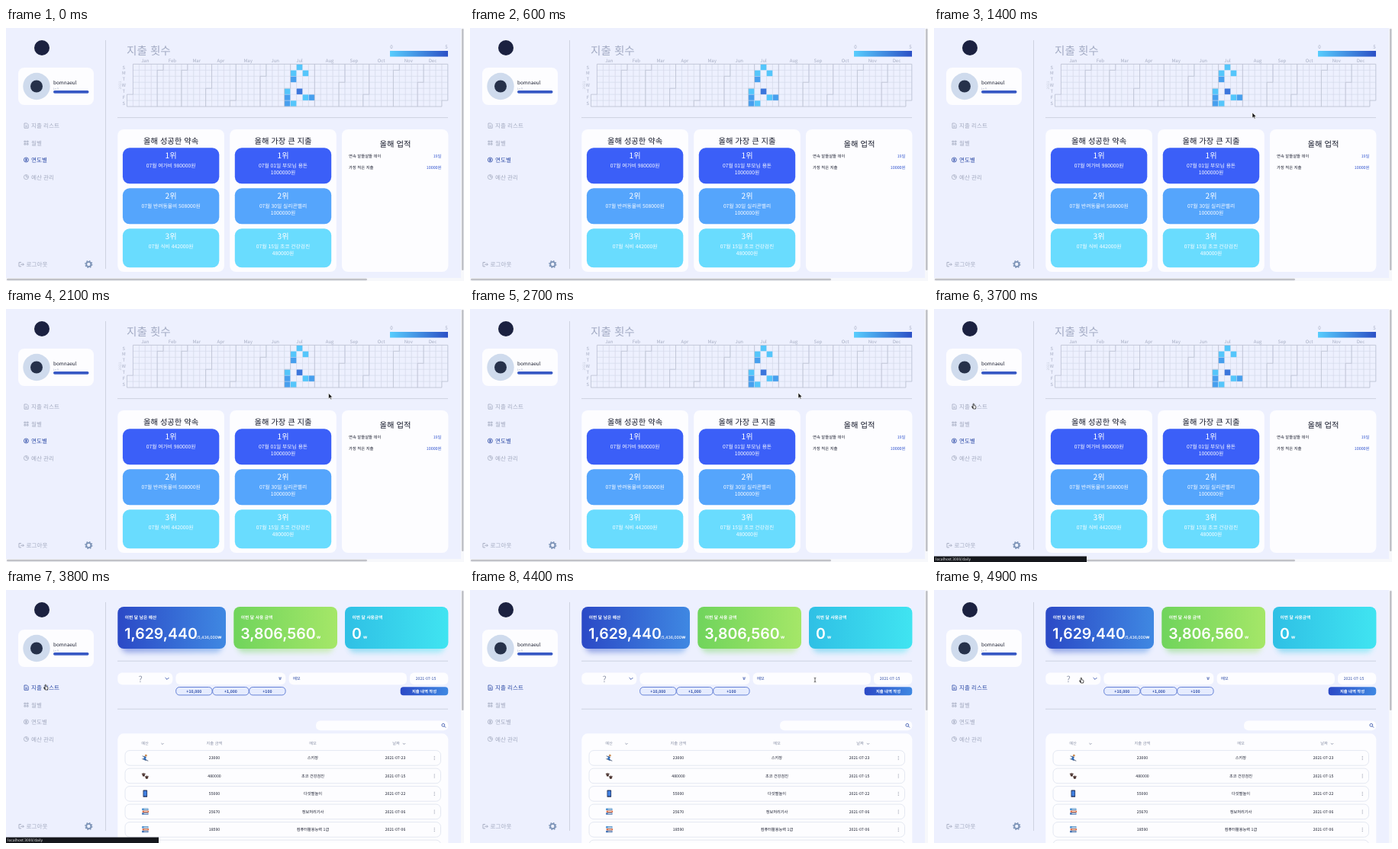
An HTML page for the animation above (5 s loop, 600x332 px).

```html
<!DOCTYPE html>
<html lang="ko">
<head>
<meta charset="utf-8">
<title>Budget dashboard</title>
<style>
html, body { margin: 0; width: 100%; height: 100%; overflow: hidden; background: #edf0fe; }
svg { display: block; width: 100vw; height: 100vh; }
text {
  font-family: "Noto Sans CJK KR", "Noto Sans CJK JP", "Noto Sans CJK", "Noto Sans", sans-serif;
  text-rendering: geometricPrecision;
}
.num { font-family: Inter, "Noto Sans CJK KR", sans-serif; }
</style>
</head>
<body>
<svg id="stage" viewBox="0 0 600 332">
  <defs>
    <linearGradient id="blue"><stop stop-color="#2b49c6"/><stop offset="1" stop-color="#3f88e2"/></linearGradient>
    <linearGradient id="green"><stop stop-color="#70d45c"/><stop offset="1" stop-color="#a5e768"/></linearGradient>
    <linearGradient id="cyan"><stop stop-color="#2fc0e5"/><stop offset="1" stop-color="#40e4f1"/></linearGradient>
    <linearGradient id="scale"><stop stop-color="#58cdfd"/><stop offset="1" stop-color="#2c50c6"/></linearGradient>
    <filter id="soft" x="-20%" y="-50%" width="140%" height="200%"><feGaussianBlur stdDeviation="3.5"/></filter>
  </defs>
  <rect width="600" height="332" fill="#edf0fe"/>
  <g id="sidebar"></g>
  <g id="yearly"></g>
  <g id="daily"></g>
  <g id="status">
    <rect y="324.5" width="200" height="7.5" fill="#15171c"/>
    <text x="2" y="330" font-size="4.9" fill="#e8e8e8">localhost:3000/daily</text>
  </g>
  <g id="cursor">
    <path id="arrow" d="M0 0V7.2L1.7 5.7 2.8 8.2 4 7.7 2.9 5.3H5.1Z" fill="#111" stroke="#fff" stroke-width=".6"/>
    <path id="hand" d="M-.9 3.3V-2.4Q-.2 -3.5 .5 -2.4V-.3L2.4 .3Q3.2 .7 3 1.6L2.5 4H-.5L-2.5 1.3Q-2.3 .2 -1.6 1Z" fill="#fff" stroke="#222" stroke-width=".8"/>
    <path id="beam" d="M-1.3 -2.8Q0 -2.8 0 -2V2Q0 2.8 -1.3 2.8M1.3 -2.8Q0 -2.8 0 -2M0 2Q0 2.8 1.3 2.8" fill="none" stroke="#222" stroke-width=".7"/>
  </g>
</svg>
<script>
const $ = id => document.getElementById(id);
const GREY = '#a4abc0', NAVY = '#2d4ba6', INK = '#161a2b', WHITE = '#fdfdff', RULE = '#c6cbda';
const MEDIUM = 'font-weight="500"', BOLD = 'font-weight="700"';

const text = (x, y, size, fill, str, more = '') =>
  `<text x="${x}" y="${y}" font-size="${size}" fill="${fill}" ${more}>${str}</text>`;
const mid = (x, y, size, fill, str, more = '') =>
  text(x, y, size, fill, str, 'text-anchor="middle" ' + more);
const box = (x, y, w, h, r, fill, more = '') =>
  `<rect x="${x}" y="${y}" width="${w}" height="${h}" rx="${r}" fill="${fill}" ${more}/>`;
const line = (d, stroke, w = .8, more = '') =>
  `<path d="${d}" fill="none" stroke="${stroke}" stroke-width="${w}" ${more}/>`;
const dot = (x, y, r, fill, more = '') => `<circle cx="${x}" cy="${y}" r="${r}" fill="${fill}" ${more}/>`;
const chevron = (x, y, s, c) => line(`M${x - s} ${y - s / 2}l${s} ${s} ${s} ${-s}`, c, .9);

function sidebar() {
  const icons = [
    'M24 125h3.5l1.7 1.8v4.5h-5.2zM25.4 128h2.3M25.4 129.6h2.3',
    'M23.9 148.2h1.9v1.7h-1.9zM27.2 148.2h1.9v1.7h-1.9zM23.9 151.5h1.9v1.7h-1.9zM27.2 151.5h1.9v1.7h-1.9z',
    'M23.4 173a3 3 0 1 0 6 0a3 3 0 1 0-6 0M25 172.2h2.8M25 174h2.8M26.4 171v4',
    'M23.4 195.6a3 3 0 1 0 6 0a3 3 0 1 0-6 0M26.4 192.8v2.8h2.9'
  ];
  let s = dot(47, 26, 10, '#1b2140')
    + box(16, 52, 99, 49, 8, WHITE)
    + dot(40, 76.5, 17.7, '#cfdbed') + dot(40, 76.5, 8, '#26314a')
    + text(62, 74.2, 6.4, INK, 'bomnaeul')
    + text(62, 80.6, 3.8, GREY, 'Lv.5')
    + box(62, 82, 46.5, 3.7, 1.8, '#3859c4');
  ['지출 리스트', '월별', '연도별', '예산 관리'].forEach((label, i) => {
    s += `<g id="menu${i}" fill="${GREY}" stroke="${GREY}">`
      + `<path d="${icons[i]}" fill="none" stroke-width=".8"/>`
      + `<text x="33" y="${130.8 + i * 22.7}" font-size="7.6" stroke="none" ${MEDIUM}>${label}</text></g>`;
  });
  return s
    + line('M20 307.5h-3v5.4h3M19 310.2h4.3M21.7 308.5l1.7 1.7-1.7 1.7', GREY, .9)
    + text(26.5, 313, 7.6, GREY, '로그아웃', MEDIUM)
    + dot(108.3, 310, 3.1, 'none', 'stroke="#7b92b6" stroke-width="1.8"')
    + dot(108.3, 310, 4.5, 'none', 'stroke="#7b92b6" stroke-width="1.2" stroke-dasharray="1.76 1.77"')
    + line('M130.5 16V316', RULE);
}

function calendar() {
  const X = 158.5, Y = 47.4, W = 7.93, H = 7.95, FIRST = 5;
  const at = day => [Math.floor((day + FIRST) / 7), (day + FIRST) % 7];
  const names = 'Jan Feb Mar Apr May Jun Jul Aug Sep Oct Nov Dec'.split(' ');
  const lengths = [31, 28, 31, 30, 31, 30, 31, 31, 30, 31, 30, 31];
  let grid = '', edges = '', s = '', day = 0;
  for (let d = 0; d < 365; d++) {
    const [c, r] = at(d);
    grid += `M${X + c * W} ${Y + r * H}h${W}v${H}h${-W}z`;
  }
  // a stepped edge runs down the left side of the given day
  const step = d => {
    const [c, r] = at(d), x = X + c * W;
    return r ? `M${x + W} ${Y}V${Y + r * H}H${x}V${Y + 7 * H}` : `M${x} ${Y}V${Y + 7 * H}`;
  };
  // July days with their shade
  const spent = [[1, 0], [2, 1], [3, 1], [5, 0], [6, 1], [10, 0], [11, 0], [15, 2], [19, 0], [23, 0], [30, 1]];
  const shades = ['#55c6fb', '#479fee', '#3c76dc'];
  let cells = '';
  names.forEach((name, i) => {
    const end = day + lengths[i] - 1;
    s += mid(X + W * (at(day)[0] + at(end)[0] + 1) / 2, 45, 6, GREY, name);
    edges += step(day);
    day = end + 1;
  });
  edges += `M${X + W} ${Y}H${X + 53 * W}V${Y + 6 * H}H${X + 52 * W}V${Y + 7 * H}H${X}`;
  for (const [d, k] of spent) {
    const [c, r] = at(180 + d);
    cells += box(X + c * W, Y + r * H, W, H, 0, shades[k], 'stroke="#dfe5f6" stroke-width=".4"');
  }
  [...'SMTWTFS'].forEach((c, i) => s += mid(154.3, Y + i * H + 6.1, 5.8, GREY, c));
  return line(grid, '#d6dbea', .5) + cells + line(edges, '#b9bfd0', .7) + s
    + mid(0, 0, 4.6, '#d0d5e4', '2021', 'transform="translate(150.6 75) rotate(-90)" ' + BOLD);
}

function yearly() {
  let s = text(158, 35.2, 14.6, '#a3abc4', '지출 횟수', MEDIUM)
    + box(503, 30, 76, 7.6, 0, 'url(#scale)')
    + mid(505, 27.4, 6.2, GREY, '0') + mid(577, 27.4, 6.2, GREY, '5')
    + calendar() + line('M146 117.6H579', RULE);
  const colors = ['#3b5ff8', '#55a5fc', '#69dcfe'];
  const lists = [
    ['올해 성공한 약속', '07월 여가비 980000원', '07월 반려동물비 508000원', '07월 식비 442000원'],
    ['올해 가장 큰 지출', '07월 01일 부모님 용돈|1000000원', '07월 30일 실리콘밸리|1000000원', '07월 15일 초코 건강검진|480000원']
  ];
  lists.forEach(([title, ...rows], i) => {
    const x = 146.3 + i * 146.9, cx = x + 69.8;
    s += box(x, 133, 139.6, 187, 8, WHITE) + mid(cx, 152.3, 10.3, INK, title);
    rows.forEach((row, k) => {
      const y = 157.3 + k * 53;
      s += box(x + 6.6, y, 126.4, k == 2 ? 51 : 47, 9, colors[k])
        + mid(cx, y + 13.6, 10.2, '#fff', k + 1 + '위');
      row.split('|').forEach((part, n) => s += mid(cx, y + 25.7 + n * 9, 6.75, '#fff', part));
    });
  });
  s += box(440, 133, 139.4, 187, 8, WHITE) + mid(510, 155.6, 10.3, INK, '올해 업적');
  [['연속 알뜰살뜰 데이', '19일'], ['가장 적은 지출', '10000원']].forEach(([a, b], i) => {
    const y = 169.6 + i * 15.6;
    s += text(449, y, 5.35, INK, a, MEDIUM)
      + text(570.5, y, 5.35, '#3457cf', b, 'text-anchor="end"');
  });
  return s + box(596, 0, 4, 332, 0, '#f7f8fb') + box(0, 328, 596, 4, 0, '#f7f8fb')
    + box(597, 1, 2.5, 317, 1.2, '#c0c1c7') + box(1, 328.8, 472, 2.5, 1.2, '#c0c1c7');
}

const pictures = {
  ski: (x, y) => dot(x + 1, y - 3, 1.4, '#c98b52')
    + line(`M${x + .4} ${y - 1.6}l-1.4 2.6 2 2`, '#3577c9', 2.4)
    + line(`M${x - 4} ${y + 1.4}l8 2.6M${x - 3.6} ${y - 2.4}l5 2`, '#4a5a78', .9),
  paws: (x, y) => [[-2, -1.4], [2.1, 1.9]].map(([a, b]) =>
    dot(x + a, y + b + .7, 1.7, '#4b3430')
    + [-1.6, 0, 1.6].map(k => dot(x + a + k, y + b - 1.4 + Math.abs(k) * .3, .8, '#4b3430')).join('')).join(''),
  phone: (x, y) => box(x - 2.8, y - 4.6, 5.6, 9.2, .9, '#26375f') + box(x - 2, y - 3.5, 4, 6.6, 0, '#3f7fe0'),
  books: (x, y) => ['#4a8fd0', '#d86a45', '#3f6fb4'].map((c, i) =>
    box(x - 4.2 + i % 2 * .6, y - 4.2 + i * 2.9, 8.4, 2.5, .6, c)
    + box(x - 1.6, y - 3.4 + i * 2.9, 5, .9, 0, '#e9e6dc')).join('')
};

function daily() {
  let s = '';
  [[146.3, 141.7, 'blue', '이번 달 남은 예산', '1,629,440', '/5,436,000₩', 249.5],
   [298.3, 135.7, 'green', '이번 달 사용 금액', '3,806,560', '₩', 407],
   [444, 135.4, 'cyan', '이번 달 사용금액', '0', '₩', 468]].forEach(([x, w, c, title, sum, unit, ux]) => {
    s += box(x + 5, 32, w - 10, 50, 8, `url(#${c})`, 'opacity=".45" filter="url(#soft)"')
      + box(x, 22, w, 55, 8, `url(#${c})`)
      + text(x + 9.5, 38.3, 5.7, '#fff', title, BOLD)
      + text(x + 9, 63.7, 19.5, '#fff', sum, 'class="num" font-weight="600"')
      + text(ux, 63.7, 5.2, '#fff', unit, 'class="num" ' + MEDIUM);
  });
  s += line('M146 93.2H579M146 156.2H579', RULE);
  [[146.3, 72], [222.4, 144], [370.6, 154.4], [529, 50.3]].forEach(([x, w]) => s += box(x, 108.4, w, 15.8, 6, WHITE));
  s += mid(176, 120.6, 11, '#8f96aa', '?', 'font-weight="300"') + chevron(211, 116.2, 2.4, NAVY)
    + mid(359, 118.4, 5.6, NAVY, '₩', MEDIUM) + text(376, 118.4, 5.3, NAVY, '메모', MEDIUM)
    + mid(550, 118.4, 5.2, NAVY, '2021-07-15', MEDIUM);
  ['+10,000', '+1,000', '+100'].forEach((label, i) => {
    s += box(222.7 + i * 48, 127.5, 47.4, 10.4, 4.5, '#e6ecff', 'stroke="#4668cc" stroke-width=".8"')
      + mid(246.4 + i * 48, 134.6, 5.2, NAVY, label, BOLD);
  });
  s += box(516.7, 127.2, 62.5, 11, 4, 'url(#blue)') + mid(548, 134.6, 5.3, '#fff', '지출 내역 작성', BOLD)
    + box(406, 171.5, 173.3, 12.8, 6, WHITE)
    + dot(572.8, 177.3, 1.9, 'none', `stroke="${NAVY}" stroke-width=".8"`) + line('M574.2 178.7l1.8 1.8', NAVY, .9)
    + box(146.3, 188.3, 433, 160, 8, WHITE);
  [[182, '예산'], [273, '지출 금액'], [402, '메모'], [511, '날짜']].forEach(([x, t]) =>
    s += mid(x, 203.4, 5.3, '#8d94a9', t, MEDIUM));
  s += chevron(205, 201.8, 1.6, '#8d94a9') + chevron(521.5, 201.8, 1.6, '#8d94a9');
  [['ski', '23000', '스키장', '23'], ['paws', '480000', '초코 건강검진', '15'],
   ['phone', '55000', '다섯별놀이', '22'], ['books', '25670', '정보처리기사', '06'],
   ['books', '18590', '컴퓨터활용능력 1급', '06'], []].forEach(([pic, sum, memo, day], i) => {
    const y = 220.4 + i * 23.5;
    s += box(156, y - 9.8, 413.5, 19.6, 6, WHITE, 'stroke="#dde2ee" stroke-width=".8"');
    if (!pic) return;
    s += pictures[pic](182.3, y - .2);
    [[273, sum], [402, memo], [510, '2021-07-' + day]].forEach(([x, t]) =>
      s += mid(x, y + 2, 5.2, INK, t, MEDIUM));
    [-2, 0, 2].forEach(k => s += dot(561.2, y + k, .5, '#6d7488'));
  });
  return s + box(596, 0, 4, 332, 0, '#f7f8fb') + box(597, 1, 2.5, 157, 1.2, '#bfc0c6');
}

$('sidebar').innerHTML = sidebar();
$('yearly').innerHTML = yearly();
$('daily').innerHTML = daily();

const LOOP = 5000, STEP = 100, ENTER = 1000, SWITCH = 3800;
// pointer stops: time, x, y
const path = [
  [1000, 417, 111], [1600, 417, 111], [2700, 430, 110], [2800, 430, 110],
  [3400, 74, 135], [3600, 52, 127], [3900, 52, 127], [4400, 452, 118], [4900, 193, 118]
];

function pointer(t) {
  const i = path.findIndex(p => p[0] > t);
  if (i < 0) return path[path.length - 1].slice(1);
  if (!i) return path[0].slice(1);
  const [t0, x0, y0] = path[i - 1], [t1, x1, y1] = path[i];
  const u = (t - t0) / (t1 - t0), e = u * u * (3 - 2 * u);
  return [x0 + (x1 - x0) * e, y0 + (y1 - y0) * e];
}

function shape(x, y, onDaily) {
  if (x > 22 && x < 72 && y > 120 && y < 134) return 'hand';
  if (!onDaily || y < 108 || y > 124) return 'arrow';
  if (x > 146 && x < 218) return 'hand';
  return (x > 222 && x < 366) || (x > 371 && x < 525) ? 'beam' : 'arrow';
}

const show = (id, on) => $(id).setAttribute('display', on ? 'inline' : 'none');

function draw(time) {
  const t = Math.floor(time % LOOP / STEP) * STEP;
  const onDaily = t >= SWITCH, [x, y] = pointer(t), kind = shape(x, y, onDaily);
  show('yearly', !onDaily);
  show('daily', onDaily);
  [0, 2].forEach(i => {
    const color = (i == 0) == onDaily ? NAVY : GREY;
    $('menu' + i).setAttribute('fill', color);
    $('menu' + i).setAttribute('stroke', color);
  });
  show('status', t >= 3600 && t < 4100);
  show('cursor', t >= ENTER);
  $('cursor').setAttribute('transform', `translate(${x} ${y})`);
  ['arrow', 'hand', 'beam'].forEach(k => show(k, k == kind));
}

const start = performance.now();
function tick() {
  draw(performance.now() - start);
  requestAnimationFrame(tick);
}
tick();
</script>
</body>
</html>
```
